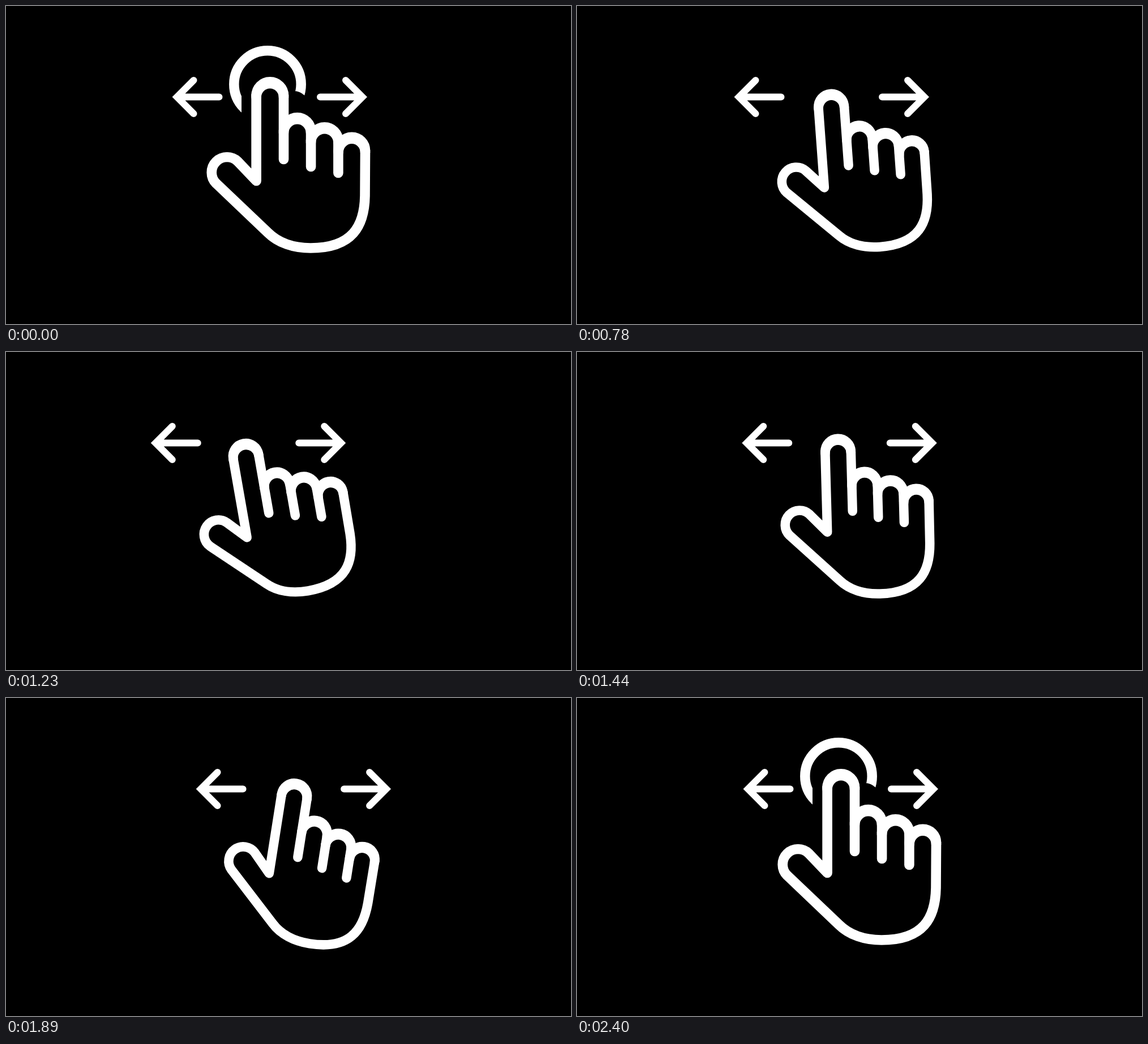
These frames come from a looping animation (998x561 px, 2.73 s). An HTML page with a canvas:

```html
<!DOCTYPE html>
<html lang="en">
<head>
<meta charset="utf-8">
<title>Swipe gesture</title>
<style>
  html, body { margin: 0; width: 100%; height: 100%; overflow: hidden; background: #000; }
  canvas { display: block; }
</style>
</head>
<body>
<canvas id="stage" width="998" height="561"></canvas>
<script>
const ctx = document.getElementById('stage').getContext('2d');
const LOOP = 2730, STEP = 30;
const PIVOT = { x: 499, y: 436 };
const SMALL = 0.94;

// Swipe keys: time, arrow shift, hand angle in degrees
const KEYS = [
  [600, 0, 0],
  [1305, -38, -10],
  [1833, 47, 10],
  [2370, 0, 0]
];

const clamp = v => Math.min(1, Math.max(0, v));
const mix = (a, b, p) => a + (b - a) * p;
const bez = (a, b, s) => 3 * a * s * (1 - s) ** 2 + 3 * b * s * s * (1 - s) + s ** 3;

// cubic-bezier(.25, .1, .25, 1)
function ease(x) {
  if (x <= 0 || x >= 1) return clamp(x);
  let lo = 0, hi = 1;
  for (let i = 0; i < 24; i++) {
    const mid = (lo + hi) / 2;
    if (bez(0.25, 0.25, mid) < x) lo = mid; else hi = mid;
  }
  return bez(0.1, 1, lo);
}

const smooth = p => p * p * (3 - 2 * p);

function swipeAt(t) {
  for (let i = 1; i < KEYS.length; i++) {
    const a = KEYS[i - 1], b = KEYS[i];
    if (t < b[0]) {
      const p = ease(clamp((t - a[0]) / (b[0] - a[0])));
      return { shift: mix(a[1], b[1], p), angle: mix(a[2], b[2], p) };
    }
  }
  return { shift: 0, angle: 0 };
}

// 1 = pressed with ring, 0 = released
function pressAt(t) {
  return t < 1300 ? 1 - smooth(clamp((t - 300) / 300))
                  : smooth(clamp((t - 2100) / 300));
}

function drawArrow(x, dir) {
  ctx.save();
  ctx.translate(x, 160.5);
  ctx.scale(dir, 1);
  ctx.lineWidth = 12;
  ctx.lineJoin = 'miter';
  ctx.beginPath();
  ctx.moveTo(29.5, -29.5);
  ctx.lineTo(0, 0);
  ctx.lineTo(29.5, 29.5);
  ctx.moveTo(2, 0);
  ctx.lineTo(74.5, 0);
  ctx.stroke();
  ctx.restore();
}

function drawRing(alpha) {
  if (alpha <= 0) return;
  ctx.save();
  ctx.globalAlpha = alpha;
  ctx.lineWidth = 17.5;
  ctx.beginPath();
  ctx.arc(462, 138, 59.2, 0, Math.PI * 2);
  ctx.stroke();
  ctx.restore();
  // Gap around the fingers
  ctx.beginPath();
  ctx.rect(416, 152, 96, 60);
  ctx.rect(505, 165, 30, 45);
  ctx.fill();
  ctx.beginPath();
  ctx.arc(509, 175, 25, 0, Math.PI * 2);
  ctx.fill();
}

function fingertip(x, y, r) {
  for (const drop of [0, 3]) {
    ctx.beginPath();
    ctx.arc(x, y + drop, r, Math.PI, 0);
    ctx.stroke();
  }
}

function bar(x, top, bottom) {
  ctx.beginPath();
  ctx.moveTo(x, top);
  ctx.lineTo(x, bottom);
  ctx.stroke();
}

function drawHand(angle, scale) {
  ctx.save();
  ctx.translate(PIVOT.x, PIVOT.y);
  ctx.rotate(angle * Math.PI / 180);
  ctx.scale(scale, scale);
  ctx.translate(-PIVOT.x, -PIVOT.y);
  ctx.lineWidth = 17.6;
  ctx.lineJoin = 'round';

  fingertip(466.3, 158, 24.2);
  fingertip(514.5, 220.7, 24);
  fingertip(562.7, 238, 24.2);
  fingertip(610.8, 255, 23.7);
  bar(490.5, 158, 270.5);
  bar(538.6, 220.7, 283.5);
  bar(586.9, 238, 294.5);

  // Thumb and palm
  ctx.beginPath();
  ctx.moveTo(442.1, 158);
  ctx.lineTo(442.1, 308.5);
  ctx.lineTo(409.6, 274.5);
  ctx.arc(390.4, 293.7, 27.2, -Math.PI / 4, Math.PI * 3 / 4, true);
  ctx.lineTo(462.8, 400);
  ctx.bezierCurveTo(481, 418, 508, 427, 538, 427);
  ctx.bezierCurveTo(612, 427, 633, 388, 634, 335);
  ctx.lineTo(634.5, 255);
  ctx.stroke();
  ctx.restore();
}

function draw(t) {
  const { shift, angle } = swipeAt(t);
  const press = pressAt(t);
  ctx.fillStyle = '#000';
  ctx.strokeStyle = '#fff';
  ctx.lineCap = 'round';
  ctx.fillRect(0, 0, 998, 561);
  drawRing(press);
  drawArrow(302 + shift, 1);
  drawArrow(629.5 + shift, -1);
  drawHand(angle, mix(SMALL, 1, press));
}

const start = performance.now();
function tick() {
  const t = (performance.now() - start) % LOOP;
  draw(Math.floor(t / STEP) * STEP);
  requestAnimationFrame(tick);
}
tick();
</script>
</body>
</html>
```
